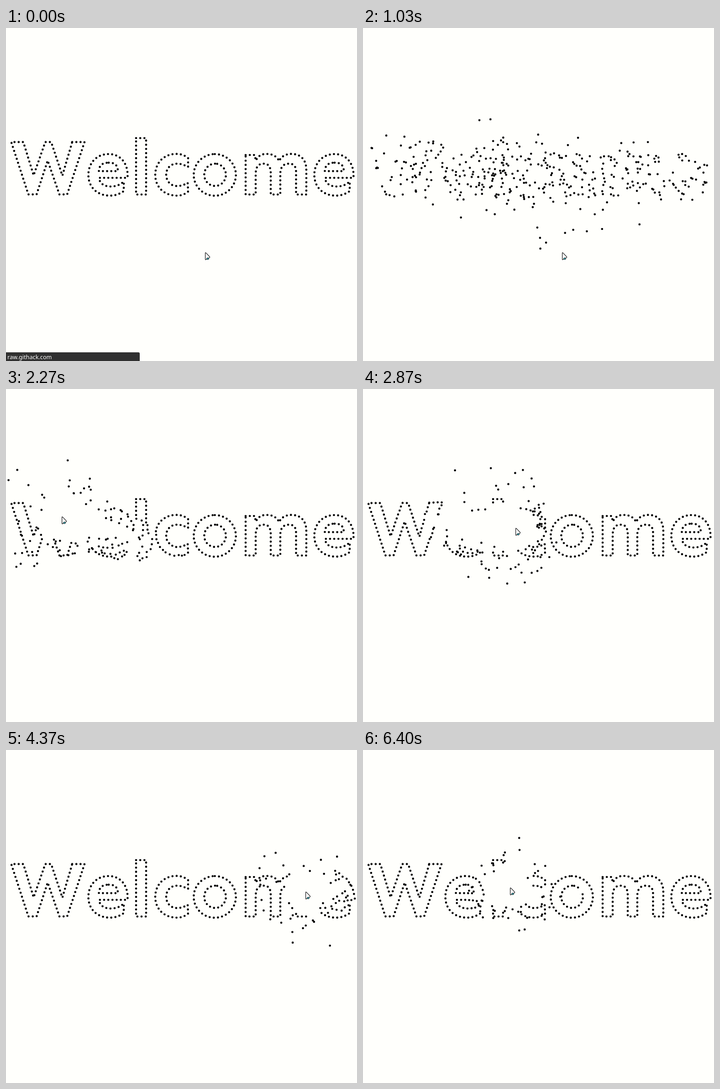
Recreate the animation shown at these times as an HTML page with a canvas. Size 769 by 729 pixels, loop 6.43 s.

```html
<!DOCTYPE html>
<html lang="en">
<head>
<meta charset="utf-8">
<title>Welcome</title>
<style>
  html, body { margin: 0; width: 100%; height: 100%; overflow: hidden; background: #fffffc; }
  canvas { display: block; }
  #status {
    position: absolute; left: 0; top: 710px; width: 293px; height: 19px;
    box-sizing: border-box; padding-left: 3px;
    border-radius: 0 3px 0 0; background: #303030; color: #fff;
    font: 12.7px/20px "Noto Sans", sans-serif; white-space: pre;
  }
</style>
</head>
<body>
<canvas id="stage" width="769" height="729"></canvas>
<div id="status">raw.githack.com</div>
<script>
const W = 769, H = 729, LOOP = 6430, TICK = 100 / 3, FRAMES = 193;
const BLANK_AT = 7, SCATTER_AT = 9, FULL_RATE_AT = 16, STEPS_PER_FRAME = 2.75;
const DOT_RADIUS = 2.35, SPACING = 9.15;
const MAX_SPEED = 10, MAX_FORCE = 1, SLOW_RADIUS = 100, FLEE_RADIUS = 50, FLEE_WEIGHT = 5;

const ctx = document.getElementById('stage').getContext('2d');
const statusBar = document.getElementById('status');

const letterE = [
  'M254.5 339C247 345 238 347 229 347C215 347 204.5 340 204 328L266 328L266.5 323' +
  'C266.5 295 250 276 225 276C199 276 180.5 295 180.5 321.5C180.5 348 199 367 228 367' +
  'C240 367 250 363 258 357L258 339.5Z',
  'M225 294.8C239 294.8 245 301 245 313.3L203.5 313.3C204 301 211 294.8 225 294.8Z'
];
const outlines = [
  ['M145 249.7L172 249.7L134 364.3L117 364.3L91.3 290.3L67 364.3L49 364.3L11.5 249.7' +
   'L38 249.7L60.5 322.6L86 249.7L99 249.7L123.5 323.2Z'],
  letterE,
  ['M285 241L307 241L307 364.5L285 364.5Z'],
  ['M399 285C391 278 383 275.7 373 275.7C346 275.7 327 295 327 321.5C327 348 346 367 375 367' +
   'C384 367 392 364 399 358L398 339C391 343 384 346 375 346C361 346 351 336 351 321' +
   'C351 307 361 297 375 297C384 297 390 300 399 304Z'],
  ['M457.5 276A46.2 45.6 0 1 1 457.4 276Z', 'M458 297A23.7 24.4 0 1 0 458.1 297Z'],
  ['M525 278L545.5 278L547 290L547.5 290C553 279 561 275.7 571 275.7C583 275.7 593 280 598.5 291.5' +
   'C603 281 613 275.7 625 275.7C645 275.7 658 287 658 312L658 364.5L635.5 364.5L635.5 316' +
   'C635.5 303 631 297 620 297C608 297 601 304 601 320L601 364.5L580 364.5L580 319' +
   'C580 303 575 297 564 297C553 297 547 304 547 320L547 364.5L525 364.5Z'],
  letterE
];

// Places dots at equal distances along an outline.
function dotsAlong(d, dx) {
  const path = document.createElementNS('http://www.w3.org/2000/svg', 'path');
  path.setAttribute('d', d);
  const dots = [], length = path.getTotalLength();
  for (let s = 0; s < length; s += SPACING) {
    const p = path.getPointAtLength(s);
    dots.push({ x: p.x + dx, y: p.y });
  }
  return dots;
}
const homes = outlines.flatMap((paths, i) =>
  paths.flatMap(d => dotsAlong(d, i === 6 ? 495 : 0)));

// Pointer tip: time in ms, x, y.
const pointerKeys = [
  [1780, 436, 491], [1860, 350, 395], [1930, 250, 318], [2020, 140, 284], [2120, 108, 279],
  [2270, 123, 279], [2600, 235, 300], [2980, 385, 305], [3200, 530, 312], [3430, 685, 308],
  [3700, 722, 312], [4150, 705, 305], [4450, 635, 312], [4730, 575, 312], [4900, 490, 308],
  [5230, 362, 300], [5500, 280, 302], [5800, 262, 305], [6100, 285, 306], [6400, 322, 301]
];

function slope(i, axis) {
  const a = pointerKeys[i - 1], b = pointerKeys[i + 1];
  return a && b ? (b[axis] - a[axis]) / (b[0] - a[0]) : 0;
}

function pointerAt(t) {
  const last = pointerKeys.length - 1;
  t = Math.min(Math.max(t, pointerKeys[0][0]), pointerKeys[last][0]);
  let i = 0;
  while (i < last - 1 && t > pointerKeys[i + 1][0]) i++;
  const a = pointerKeys[i], b = pointerKeys[i + 1], span = b[0] - a[0], u = (t - a[0]) / span;
  const hermite = axis =>
    a[axis] * (1 + 2 * u) * (1 - u) ** 2 + b[axis] * u * u * (3 - 2 * u) +
    span * u * (1 - u) * (slope(i, axis) * (1 - u) - slope(i + 1, axis) * u);
  return { x: hermite(1), y: hermite(2) };
}

function seededRandom(seed) {
  return () => {
    seed = (seed + 0x6D2B79F5) | 0;
    let r = Math.imul(seed ^ (seed >>> 15), 1 | seed);
    r = (r + Math.imul(r ^ (r >>> 7), 61 | r)) ^ r;
    return ((r ^ (r >>> 14)) >>> 0) / 4294967296;
  };
}

// Steering force towards a wanted velocity, limited in size.
function steer(p, wantX, wantY) {
  const x = wantX - p.vx, y = wantY - p.vy, size = Math.hypot(x, y);
  const k = size > MAX_FORCE ? MAX_FORCE / size : 1;
  return { x: x * k, y: y * k };
}

function step(p, pointer) {
  let dx = p.home.x - p.x, dy = p.home.y - p.y, d = Math.hypot(dx, dy) || 1;
  const speed = MAX_SPEED * Math.min(1, d / SLOW_RADIUS);
  const force = steer(p, dx / d * speed, dy / d * speed);
  if (pointer) {
    dx = p.x - pointer.x;
    dy = p.y - pointer.y;
    d = Math.hypot(dx, dy) || 1;
    if (d < FLEE_RADIUS) {
      const flee = steer(p, dx / d * MAX_SPEED, dy / d * MAX_SPEED);
      force.x += flee.x * FLEE_WEIGHT;
      force.y += flee.y * FLEE_WEIGHT;
    }
  }
  p.x += p.vx;
  p.y += p.vy;
  p.vx += force.x;
  p.vy += force.y;
}

// The simulation runs slowly just after the reload, then at full rate.
function stepsDone(k) {
  const slow = Math.min(k, FULL_RATE_AT) - SCATTER_AT;
  return Math.max(0, slow) + Math.floor(Math.max(0, k - FULL_RATE_AT) * STEPS_PER_FRAME);
}

function simulate() {
  const random = seededRandom(59);
  const particles = homes.map(home => {
    const angle = random() * Math.PI * 2;
    return { home, x: random() * W, y: random() * H, vx: Math.cos(angle), vy: Math.sin(angle) };
  });
  const frames = [];
  for (let k = 0; k < FRAMES; k++) {
    if (k < BLANK_AT) { frames.push(homes); continue; }
    if (k < SCATTER_AT) { frames.push([]); continue; }
    const steps = stepsDone(k) - stepsDone(k - 1);
    for (let s = 1; s <= steps; s++) {
      const t = (k - 1 + s / steps) * TICK;
      const pointer = t > pointerKeys[0][0] ? pointerAt(t) : null;
      particles.forEach(p => step(p, pointer));
    }
    frames.push(particles.map(({ x, y }) => ({ x, y })));
  }
  return frames;
}

const arrow = new Path2D('M.6 2Q.6 0 2 1.2L10 9.6Q11.4 11.6 9.4 12L5.4 13L2.2 16Q.6 17 .6 15Z');

function drawPointer({ x, y }) {
  ctx.save();
  ctx.translate(Math.round(x), Math.round(y));
  ctx.fillStyle = '#fff';
  ctx.strokeStyle = '#111';
  ctx.lineWidth = 1.2;
  ctx.fill(arrow);
  ctx.stroke(arrow);
  ctx.beginPath();
  ctx.ellipse(6, 14, 2.5, 1.9, 0, 0, Math.PI * 2);
  ctx.fillStyle = '#3fa9b5';
  ctx.fill();
  ctx.lineWidth = 0.9;
  ctx.stroke();
  ctx.restore();
}

const frames = simulate();

function draw(t) {
  const k = Math.min(FRAMES - 1, Math.floor((t + 3.4) / TICK));
  ctx.fillStyle = '#fffffc';
  ctx.fillRect(0, 0, W, H);
  ctx.fillStyle = '#000';
  ctx.beginPath();
  for (const { x, y } of frames[k]) {
    ctx.moveTo(x + DOT_RADIUS, y);
    ctx.arc(x, y, DOT_RADIUS, 0, Math.PI * 2);
  }
  ctx.fill();
  drawPointer(pointerAt(k * TICK));
  statusBar.hidden = k >= BLANK_AT;
  statusBar.textContent = k < 2 ? 'raw.githack.com' : 'Read raw.githack.com';
}

let start;
function loop(now) {
  start ??= now;
  draw((now - start) % LOOP);
  requestAnimationFrame(loop);
}
draw(0);
requestAnimationFrame(loop);
</script>
</body>
</html>
```
